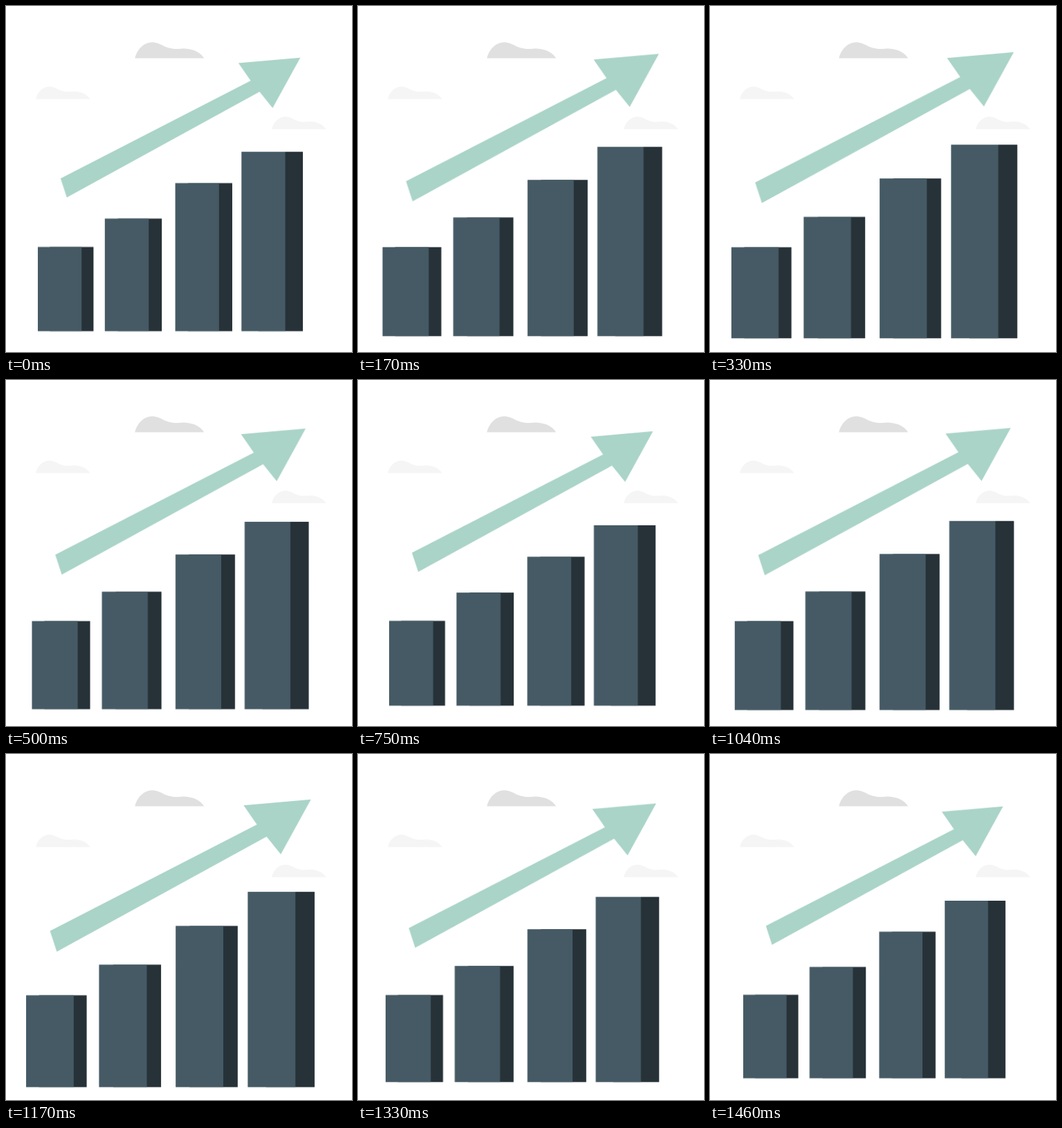
An HTML page without scripts for the animation above (1540 ms loop, 500 by 500 pixels).

```html
<!DOCTYPE html>
<html lang="en">
<head>
<meta charset="utf-8">
<title>Growth chart</title>
<style>
  html, body { margin: 0; width: 100%; height: 100%; overflow: hidden; background: #fff; }
  svg { display: block; width: 100vw; height: 100vh; }

  .beat {
    transform-box: fill-box;
    transform-origin: center;
    animation: beat 1540ms -3ms infinite;
  }
  .front { fill: #455a64; }
  .side { fill: #263238; }
  .arrow { fill: #aad4c8; }

  /* 37 ticks per loop; each segment steps once per tick */
  @keyframes beat {
    0%      { transform: scale(1.0106); animation-timing-function: steps(4); }
    10.811% { transform: scale(1.066);  animation-timing-function: steps(2); }
    16.216% { transform: scale(1.094);  animation-timing-function: steps(1); }
    18.919% { transform: scale(1.099);  animation-timing-function: steps(5); }
    32.432% { transform: scale(1.0555); animation-timing-function: steps(6); }
    48.649% { transform: scale(1.016);  animation-timing-function: steps(2); }
    54.054% { transform: scale(1.005);  animation-timing-function: steps(1); }
    56.757% { transform: scale(1.005);  animation-timing-function: steps(1); }
    59.459% { transform: scale(1.021);  animation-timing-function: steps(4); }
    70.27%  { transform: scale(1.079);  animation-timing-function: steps(2); }
    75.676% { transform: scale(1.1);    animation-timing-function: steps(7); }
    94.595% { transform: scale(1);      animation-timing-function: steps(1); }
    97.297% { transform: scale(1);      animation-timing-function: steps(1); }
    100%    { transform: scale(1.0106); }
  }
</style>
</head>
<body>
<svg viewBox="0 0 500 500">
  <defs>
    <path id="cloud" d="M0 0C3 -13 13 -23 25 -23C38 -23 42 -13.5 60 -13.5C65 -13.5 67 -14 72 -14C84 -13.5 94 -9 100 0Z"/>
  </defs>

  <use href="#cloud" fill="#e0e0e0" transform="translate(186.3 75.5)"/>
  <g fill="#f5f5f5">
    <use href="#cloud" transform="translate(43 134.6) scale(.785)"/>
    <use href="#cloud" transform="translate(384 178) scale(.785)"/>
  </g>

  <g class="beat">
    <path class="side" d="M65 348H127.6V468.6H65ZM162.5 307.6H225.3V468.6H162.5ZM262.8 256.7H326V468.6H262.8ZM363.4 212H427V468.6H363.4Z"/>
    <path class="front" d="M48 348H110.6V468.6H48ZM143.8 307.6H206.6V468.6H143.8ZM244.5 256.7H307.1V468.6H244.5ZM339.2 212H401.8V468.6H339.2Z"/>
  </g>

  <path class="beat arrow" d="M80.7 248.4L89.6 275.6L365.2 124.5L383.9 147.7L423.5 75.7L335 83.4L352.5 108.6Z"/>
</svg>
</body>
</html>
```
